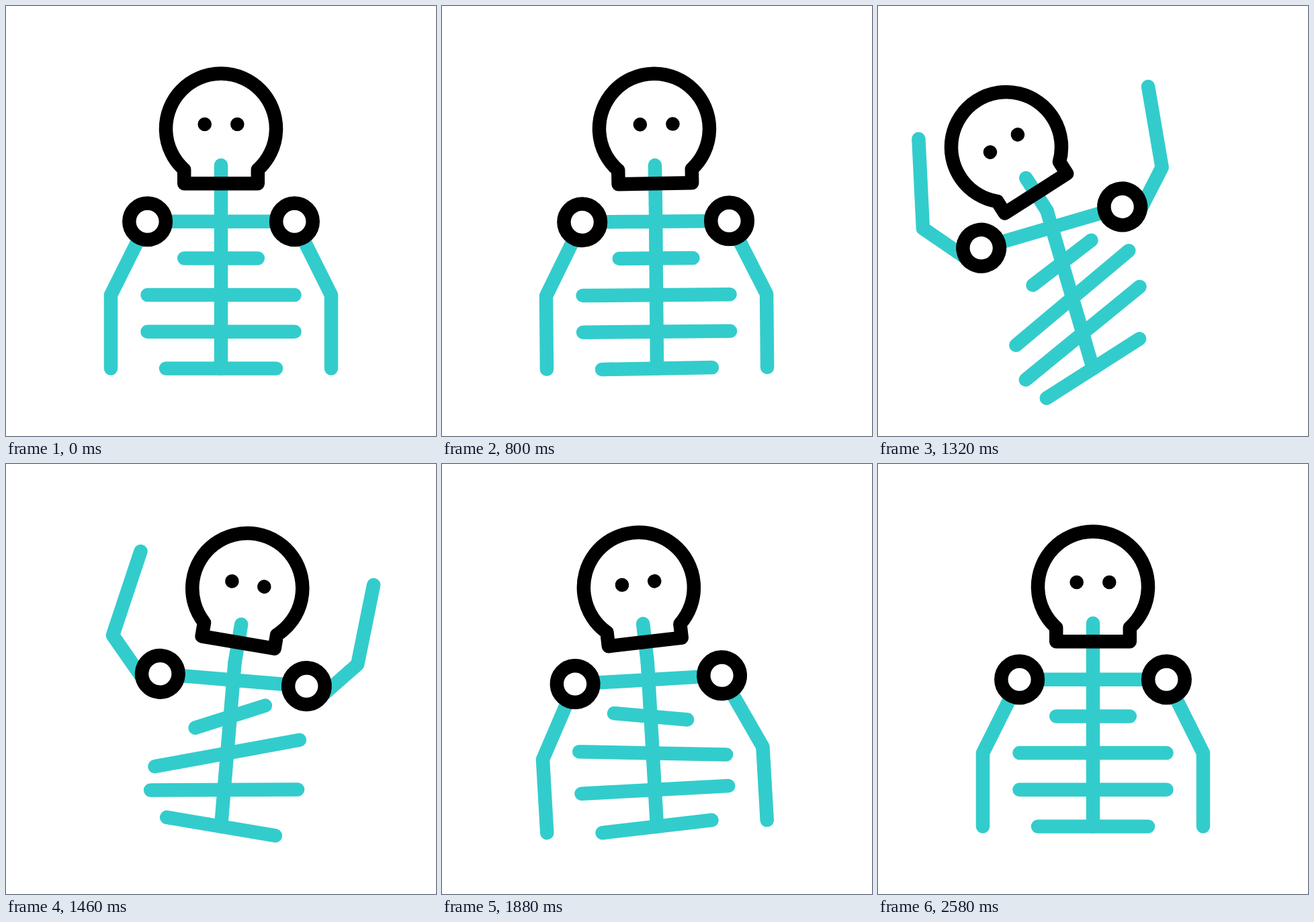
Recreate the animation shown at these times as an HTML page. Size 640 by 640 pixels, loop 2700 ms.

```html
<!DOCTYPE html>
<html lang="en">
<head>
<meta charset="utf-8">
<title>Dancing skeleton</title>
<style>
  html, body { margin: 0; width: 100%; height: 100%; overflow: hidden; background: #fff; }
  svg { display: block; width: 100%; height: 100%; }
  .bone { fill: none; stroke: #3cc; stroke-width: 20.5; stroke-linecap: round; stroke-linejoin: round; }
  .ink { fill: none; stroke: #000; stroke-width: 20.5; stroke-linejoin: round; }
</style>
</head>
<body>
<svg viewBox="0 0 640 640">
  <g id="body">
    <path class="bone" d="M320 539.5V295M225 320.75H415"/>
    <path class="bone rib" d="M265.2 375.5H374.8"/>
    <path class="bone rib" d="M210.5 430.1H429.5"/>
    <path class="bone rib" d="M210.5 484.8H429.5"/>
    <path class="bone rib" d="M238 539.5H402"/>
    <path class="bone arm"/>
    <path class="bone arm"/>
    <circle class="ink" cx="210.6" cy="320.75" r="27.3" style="fill:#fff"/>
    <circle class="ink" cx="429.4" cy="320.75" r="27.3" style="fill:#fff"/>
    <g id="head">
      <path class="bone" d="M320 295V237"/>
      <path class="ink" d="M265.2 243.6A82 82 0 1 1 374.8 243.6V264.3H265.2Z"/>
      <g id="eyes">
        <circle cx="295.7" cy="176" r="10.3"/>
        <circle cx="344.3" cy="176" r="10.3"/>
      </g>
    </g>
  </g>
</svg>
<script>
const LOOP = 2700, RIB_LAG = 66;
const $ = s => document.querySelector(s);
const body = $('#body'), head = $('#head'), eyes = $('#eyes');
const ribs = [...document.querySelectorAll('.rib')];
const arms = [...document.querySelectorAll('.arm')];
const ribY = [375.5, 430.1, 484.8, 539.5];

// Keys are [time, value]
const lookKeys = [[0, 0], [285, -35], [570, 35], [855, 0]];
const swayKeys = [[762, 0], [1220, -24], [1558, 12], [1985, -6], [2370, 0]];

// Poses are elbow x, y and hand x, y measured from the shoulder
const armKeys = [
  { x: 210.6, side: -1, out: [-87.7, -5.5, -100.3, -87.6], up: [-75.1, -52.3, -44, -182] },
  { x: 429.4, side: 1, out: [87.5, 7, 125.5, -77], up: [73, -39.7, 87, -161] }
].map(({ x, side, out, up }) => {
  const rest = [side * 54.6, 109.4, side * 54.6, 218.8];
  return { x, side, keys: [[795, rest], [1105, out], [1215, up], [1445, up], [1780, rest]] };
});

const smooth = x => x * x * (3 - 2 * x);

function mix(a, b, k) {
  return Array.isArray(a) ? a.map((v, i) => v + (b[i] - v) * k) : a + (b - a) * k;
}

function at(keys, t) {
  if (t <= keys[0][0]) return keys[0][1];
  for (let i = 1; i < keys.length; i++) {
    const [t0, a] = keys[i - 1], [t1, b] = keys[i];
    if (t < t1) return mix(a, b, smooth((t - t0) / (t1 - t0)));
  }
  return keys[keys.length - 1][1];
}

function turn(el, angle, y) {
  el.setAttribute('transform', `rotate(${angle} 320 ${y})`);
}

function draw(t) {
  const sway = at(swayKeys, t);
  turn(body, sway, 539.5);
  turn(head, sway, 295);
  ribs.forEach((rib, i) => turn(rib, at(swayKeys, t - (3 - i) * RIB_LAG), ribY[i]));
  eyes.setAttribute('transform', `translate(${at(lookKeys, t)} 0)`);
  armKeys.forEach(({ x, side, keys }, i) => {
    const [ex, ey, hx, hy] = at(keys, t), y = 320.75;
    arms[i].setAttribute('d',
      `M${x + side * 12.2} ${y + 24.5}L${x + ex} ${y + ey}L${x + hx} ${y + hy}`);
  });
}

const start = performance.now();
function tick() {
  draw((performance.now() - start) % LOOP);
  requestAnimationFrame(tick);
}
tick();
</script>
</body>
</html>
```
